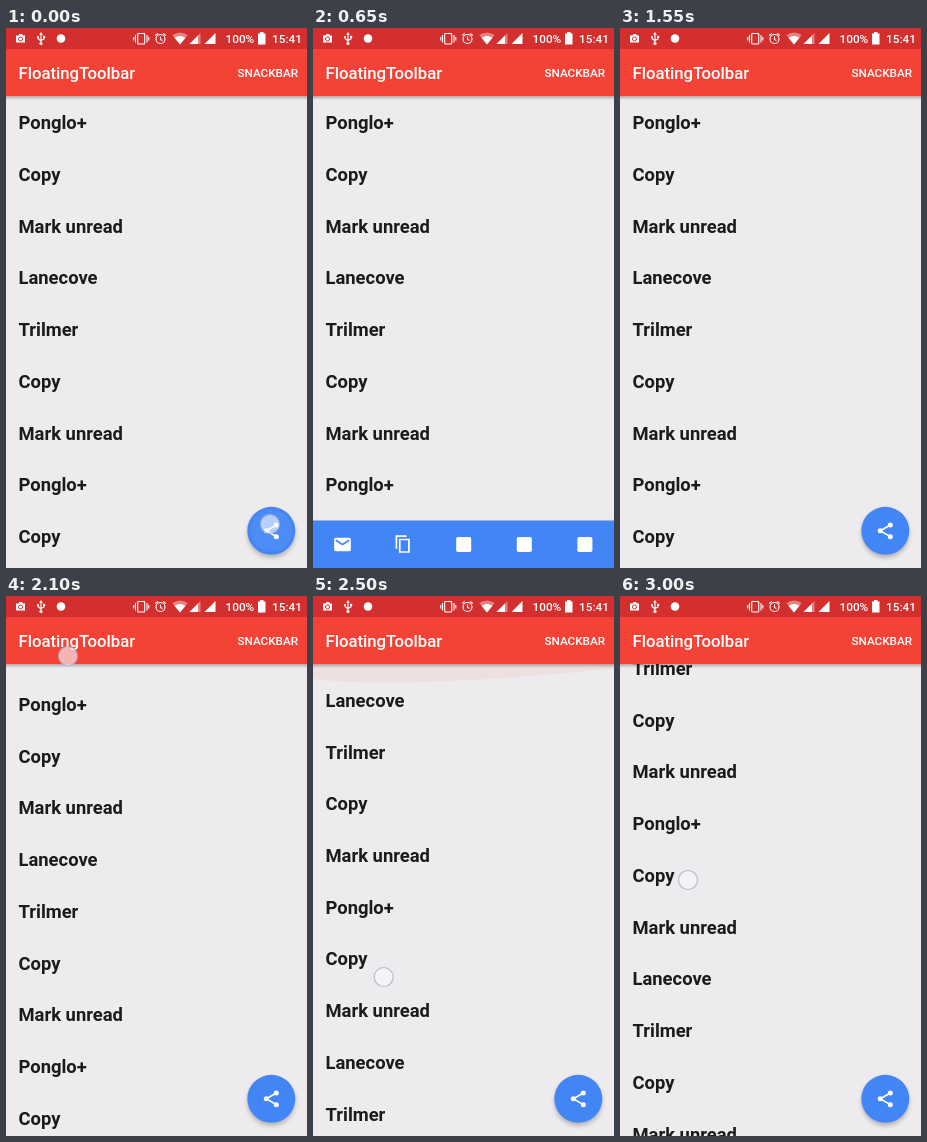
Animation, 301 px wide and 540 px high, one loop 3050 ms. Source, as an HTML page:

```html
<!DOCTYPE html>
<html lang="en">
<head>
<meta charset="utf-8">
<title>FloatingToolbar</title>
<style>
  html, body { margin: 0; width: 100%; height: 100%; overflow: hidden; background: #edebee; }
  svg { display: block; width: 100vw; height: 100vh; font-family: Roboto, "Noto Sans", sans-serif; }
  #list { font-size: 18.4px; font-weight: 700; fill: #1b1a1c; }
  #lift { filter: drop-shadow(0 3px 2px rgba(0, 0, 0, .24)); }
</style>
</head>
<body>
<svg viewBox="0 0 301 540">
  <defs>
    <linearGradient id="shade" x2="0" y2="1">
      <stop stop-color="#000" stop-opacity=".28"/>
      <stop offset="1" stop-color="#000" stop-opacity="0"/>
    </linearGradient>
    <clipPath id="bar"><rect y="492.5" width="301" height="47.5"/></clipPath>
    <clipPath id="hole"><circle id="holeCircle"/></clipPath>
    <clipPath id="page"><rect y="68" width="301" height="472"/></clipPath>
  </defs>

  <rect width="301" height="540" fill="#edebee"/>
  <g id="list"></g>
  <path id="glow" fill="#f4573a" clip-path="url(#page)"/>

  <rect y="68" width="301" height="4" fill="url(#shade)"/>
  <rect y="21" width="301" height="47" fill="#f44336"/>
  <rect width="301" height="21" fill="#d32f2f"/>
  <g fill="#fff" font-weight="500">
    <text x="12.5" y="51" font-size="16.7">FloatingToolbar</text>
    <text x="231.5" y="49" font-size="11.7">SNACKBAR</text>
    <text x="219.5" y="15" font-size="11.8">100%</text>
    <text x="266" y="15" font-size="11.8">15:41</text>
  </g>

  <!-- status icons -->
  <g fill="#fff">
    <path d="M10 7.5h2.5l1-1.5h2.5l1 1.5H19v7h-9z"/>
    <circle cx="14.5" cy="11" r="2" fill="none" stroke="#d32f2f"/>
    <circle cx="55" cy="10.5" r="4.3"/>
    <path d="M35 4l1.8 2.8h-3.6z"/>
    <circle cx="35" cy="15.5" r="1.6"/>
    <circle cx="32" cy="9" r="1.1"/>
    <rect x="37" y="7.8" width="2.2" height="2.2"/>
    <path d="M174 16.5L166.3 7q7.7-5 15.4 0z" opacity=".4"/>
    <path d="M174 16.5L168.5 9.7q5.5-3.2 11 0z"/>
    <path d="M183.5 16h11V5z" opacity=".4"/>
    <path d="M183.5 16H192V7.5z"/>
    <path d="M198.500 16h11V5z"/>
    <path d="M252 5.5h2V4h3.5v1.5h2v11H252z"/>
  </g>
  <g fill="none" stroke="#fff" stroke-width="1.1">
    <path d="M35 6v9M32 9v1.5l3 2.5M38 9.5V11l-3 1.5"/>
    <rect x="131.7" y="5.5" width="7" height="10.5" rx=".8"/>
    <path d="M129.500 7v7.5M141 7v7.5M127.700 9v3.5M142.800 9v3.5"/>
    <circle cx="154.5" cy="11" r="4.5"/>
    <path d="M154.500 8.5v3l2 1M149.300 7.500l2.500-2.200M159.700 7.500l-2.500-2.200"/>
  </g>

  <g id="lift">
    <g id="surface">
      <circle id="blob" fill="#4285f4"/>
      <circle id="fabRipple" r="21" fill="#fff"/>
    </g>
  </g>
  <g id="share" fill="#fff">
    <path d="M6 -7L-6 0L6 7" fill="none" stroke="#fff" stroke-width="2"/>
    <circle cx="6" cy="-7" r="3"/><circle cx="-6" r="3"/><circle cx="6" cy="7" r="3"/>
  </g>

  <g clip-path="url(#bar)"><g clip-path="url(#hole)">
    <circle id="ripple" cx="29.5" cy="517" fill="#0b2f70"/>
    <g id="items"></g>
  </g></g>

  <circle id="touch" r="9.5" fill="#f8f9ff" fill-opacity=".62" stroke="#9fadc6" stroke-opacity=".75" stroke-width="1.2"/>
</svg>

<script>
const LOOP = 3050, STEP = 50, ROW = 51.72, FAB = 24, FULL = 156;
const labels = ["Lanecove", "Trilmer", "Copy", "Mark unread", "Ponglo+", "Copy", "Mark unread"];
const el = id => document.getElementById(id);
const set = (id, attrs) => Object.entries(attrs).forEach(([k, v]) => el(id).setAttribute(k, v));
const clamp = v => Math.min(1, Math.max(0, v));
const mix = (a, b, p) => a + (b - a) * p;
const span = (t, from, to) => clamp((t - from) / (to - from));
const smooth = p => (1 - Math.cos(Math.PI * p)) / 2;

el("list").innerHTML = Array.from({ length: 14 }, (_, i) =>
  `<text x="12.5" y="${110.8 + i * ROW}">${labels[i % 7]}</text>`).join("");

const square = '<rect x="-9" y="-9" width="18" height="18" rx="2"/>';
const icons = [
  '<path d="M-8-8H8q2 0 2 2V6q0 2-2 2H-8q-2 0-2-2V-6q0-2 2-2z"/><path d="M-8-5L0 0L8-5" fill="none" stroke="#4285f4" stroke-width="2"/>',
  '<path d="M4-10H-8V5M-4-6H7V9H-4z" fill="none" stroke="#fff" stroke-width="2"/>',
  square, square, square
];
el("items").innerHTML = icons.map((shape, i) =>
  `<g fill="#fff" transform="translate(${29.5 + i * 60.6} 516.5) scale(.836)">${shape}</g>`).join("");

function scrollAt(t) {
  if (t < 2100) return 216.5;
  if (t < 2300) return mix(216.5, 11, smooth(span(t, 2060, 2300)));
  if (t < 2750) return mix(11, 0, span(t, 2300, 2350));
  return 83.5 * span(t, 2750, 3000) ** 1.5;
}

// Finger position, or null while nothing is pressed.
function touchAt(t) {
  if (t < 150) return [264, 496];
  if (t >= 900 && t < 1100) return [29.5, 517];
  if (t < 2100) return null;
  if (t < 2300) return [mix(62, 65, span(t, 2100, 2300)), mix(60, 227, span(t, 2100, 2300))];
  if (t < 2650) {
    const p = span(t, 2300, 2650);
    return [mix(65, 75, p), mix(227, 424, Math.sin(p * Math.PI / 2))];
  }
  if (t < 2750) return [75, mix(424, 413, span(t, 2650, 2750))];
  return [mix(75, 68, span(t, 2750, 3000)), mix(413, 284, span(t, 2750, 3000) ** 1.2)];
}

function drawMorph(t) {
  const opening = t < 900;
  const shift = opening ? smooth(span(t, 150, 473)) : 1 - smooth(span(t, 1270, 1530));
  const drop = opening ? smooth(span(t, 150, 300)) : 1 - smooth(span(t, 1400, 1550));
  const reveal = opening ? span(t, 280, 600) ** 2 : (1 - span(t, 1190, 1400)) ** 2;
  const x = mix(265.3, 150.5, shift), y = mix(502.8, 517, drop), r = mix(FAB, FULL, reveal);

  set("blob", { cx: x, cy: y, r });
  set("holeCircle", { cx: x, cy: y, r });
  set("surface", { "clip-path": reveal > 0 ? "url(#bar)" : "none" });

  const shareAlpha = opening ? 1 - span(t, 150, 300) : span(t, 1380, 1470);
  set("share", { transform: `translate(${x} ${y}) scale(.836)`, opacity: shareAlpha });
  set("fabRipple", { cx: x, cy: y, opacity: .06 * (1 - span(t, 50, 250)) });

  const itemAlpha = opening ? span(t, 390, 640) : 1 - span(t, 1160, 1300);
  set("items", { opacity: itemAlpha, transform: `translate(${opening ? x - 150.5 : 0} 0)` });

  const pressed = t >= 900 && t < 1350;
  set("ripple", {
    r: mix(8, 30.5, span(t, 900, 1100)),
    opacity: pressed ? .11 * (1 - span(t, 1160, 1350)) : 0
  });
}

function drawGlow(t) {
  const grow = smooth(span(t, 2300, 2600)), fade = 1 - span(t, 2620, 2900);
  const depth = 40 * grow * fade ** .7;
  set("glow", {
    d: `M0 ${68 + depth * .5}Q95 ${68 + depth * .85} 301 ${68 + depth * .15}V68H0z`,
    opacity: .1 * grow * fade
  });
}

function draw(t) {
  set("list", { transform: `translate(0 ${-scrollAt(t)})` });
  drawGlow(t);
  drawMorph(t);
  const finger = touchAt(t);
  set("touch", { opacity: finger ? 1 : 0 });
  if (finger) set("touch", { cx: finger[0], cy: finger[1] });
}

const start = performance.now();
function tick() {
  const t = (performance.now() - start) % LOOP;
  draw(Math.floor(t / STEP) * STEP);
  requestAnimationFrame(tick);
}
tick();
</script>
</body>
</html>
```
